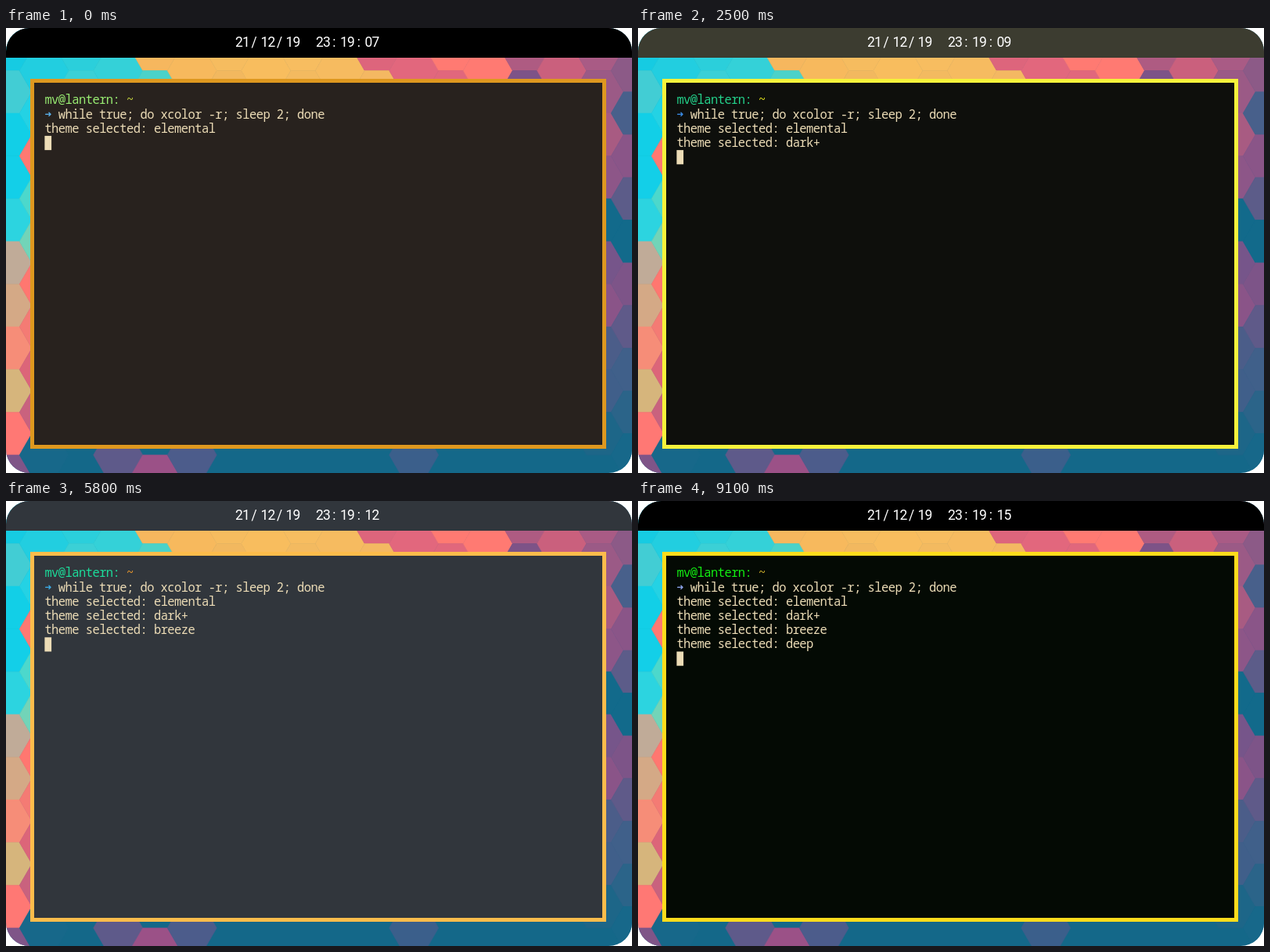
Animation of 800 by 569 pixels, one loop 9150 ms. Source, as an HTML page:

```html
<!DOCTYPE html>
<html lang="en">
<head>
<meta charset="utf-8">
<title>Terminal theme switcher</title>
<style>
  html, body { margin: 0; width: 100%; height: 100%; overflow: hidden; background: #fff; }
  svg { display: block; width: 800px; height: 569px; border-radius: 30px; overflow: hidden; }
  text { white-space: pre; }
  .term { font: 15.5px "Noto Sans Mono", "DejaVu Sans Mono", monospace; letter-spacing: -.58px; fill: #ecdcb6; }
  .clock { font: 17.5px Roboto, "Open Sans", sans-serif; letter-spacing: -.8px; fill: #fff; text-anchor: middle; }
  #arrow { font: 14.5px "DejaVu Sans Mono", monospace; letter-spacing: 0; }
</style>
</head>
<body>
<svg viewBox="0 0 800 569">
  <rect width="800" height="569" fill="#146889"/>
  <g id="wall" stroke-width=".6"></g>
  <rect id="bar" width="800" height="38"/>
  <g id="clock" class="clock"></g>
  <rect id="win" x="33.5" y="67.5" width="731" height="468" stroke-width="5"/>
  <g id="term" class="term">
    <text id="user" x="49.4" y="97.4">mv@lantern:</text>
    <text id="tilde" x="154" y="97.4">~</text>
    <text id="arrow" x="49.4" y="115.4">➜</text>
    <text x="66.8" y="115.6">while true; do xcolor -r; sleep 2; done</text>
  </g>
  <rect id="cursor" x="49.4" width="8.7" height="18.2" fill="#ecdcb6"/>
</svg>
<script>
const LOOP = 9150, ROW = 18.2, TOP = 83.3;
const $ = id => document.getElementById(id);

function add(parent, tag, attrs, text = '') {
  const el = document.createElementNS('http://www.w3.org/2000/svg', tag);
  for (const key in attrs) el.setAttribute(key, attrs[key]);
  el.textContent = text;
  parent.append(el);
  return el;
}

// Flat-topped honeycomb: columns 47.25 apart, odd ones half a cell lower.
function hex(col, row, color) {
  const cx = 1.5 + 47.25 * col, cy = 27.2 + 54.6 * (row + col % 2 / 2);
  const points = [];
  for (let i = 0; i < 6; i++) {
    const a = i * Math.PI / 3;
    points.push((cx + 31.5 * Math.cos(a)).toFixed(2) + ',' + (cy + 31.5 * Math.sin(a)).toFixed(2));
  }
  add($('wall'), 'polygon', { points: points.join(' '), fill: color, stroke: color });
}

// Each entry: column, first row, colours downwards.
const columns = [
  [0, 0, '#16cbe2 #42cdd4 #12cfe7 #13cfe8 #2cd4e0 #c0ab98 #d4a986 #f68d78 #d6b57c #ff7874 #7f5588'],
  [1, 0, '#22cee0 #24d2e4 #ff7972 #4cd8cc #72d4b8 #ff7770 #f47b74 #dc6579 #c9627e #17688a'],
  [2, 0, '#2bcfdb #3bd0d6'],
  [3, 0, '#34d1d8'],
  [4, 0, '#f6b75e #4bd2c9'],
  [5, 0, '#f7b95d'],
  [6, 0, '#f6bc5f #f2b85f'],
  [7, 0, '#f8bd5e'],
  [8, 0, '#f7bd60 #f3ba60'],
  [9, 0, '#f6bb60'],
  [10, 0, '#dd657c #f4b862'],
  [11, 0, '#e2677d'],
  [12, 0, '#ff7a72 #e1677c'],
  [13, 0, '#ff7a72'],
  [14, 0, '#ae5b82 #7d5387'],
  [15, 0, '#ca607d'],
  [16, 0, '#a95b85 #9b5a86 #a85b82 #8d5688 #126a8b #76558a #8a5488 #4b5d89 #405f8a #1d6688'],
  [17, 0, '#8c5a87 #48608b #8a5588 #5c5c89 #126a8b #7d5488 #5f5a89 #40608a #2b6489 #17688a'],
  [3, 9, '#5e5a8a'],
  [4, 10, '#9b5187'],
  [5, 9, '#4c5c8b'],
  [11, 9, '#3b5f8b']
];
for (const [col, first, list] of columns)
  list.split(' ').forEach((color, i) => hex(col, first + i, color));

const slots = [302.5, 317, 335, 349.5, 367, 405.5, 419.5, 436.5, 451, 468];
const clock = ['21', '/', '12', '/', '19', '23', ':', '19', ':', '07'].map((part, i) =>
  add($('clock'), 'text', { x: slots[i] - .4, y: 24.4 }, part));
const seconds = clock[9];

const lines = ['elemental', 'dark+', 'breeze', 'deep'].map((name, i) =>
  add($('term'), 'text', { x: 49.4, y: TOP + ROW * (i + 2) + 14.1 }, 'theme selected: ' + name));

// Index 0 is the look before the first switch.
const themes = [
  { bg: '#28221e', bar: '#000000', border: '#de981f', user: '#98ec72', tilde: '#c8d840', arrow: '#5cb4f0' },
  { bg: '#22211b', bar: '#3c3c30', border: '#de981f', user: '#61e070', tilde: '#7f7111', arrow: '#7bd4d0' },
  { bg: '#0e0f0c', bar: '#000000', border: '#f5f23b', user: '#23d18b', tilde: '#e5e51c', arrow: '#3b8eea' },
  { bg: '#31363c', bar: '#31363c', border: '#fdbc4b', user: '#1cdc9a', tilde: '#ee9a2c', arrow: '#3daee9' },
  { bg: '#040a04', bar: '#000000', border: '#ffdc1c', user: '#12ee12', tilde: '#d2b32c', arrow: '#8fa8f0' }
];

// Number of switches done, for parts that react after a delay.
const switched = (t, delay) => Math.min(4, Math.max(0, Math.floor((t + 100 - delay) / 2300) + 1));

function draw() {
  const t = performance.now() % LOOP;
  const count = switched(t, 0);
  const palette = themes[switched(t, 300)];

  $('win').setAttribute('stroke', themes[count].border);
  $('win').setAttribute('fill', palette.bg);
  $('bar').setAttribute('fill', themes[switched(t, 450)].bar);
  for (const id of ['user', 'tilde', 'arrow']) $(id).style.fill = palette[id];

  lines.forEach((line, i) => line.style.display = i < count ? '' : 'none');
  $('cursor').setAttribute('y', TOP + ROW * (count + 2));

  const now = String(7 + Math.floor((t - 200) / 1000)).padStart(2, '0');
  seconds.textContent = t < 1200 ? '07' : now;
  requestAnimationFrame(draw);
}
draw();
</script>
</body>
</html>
```
